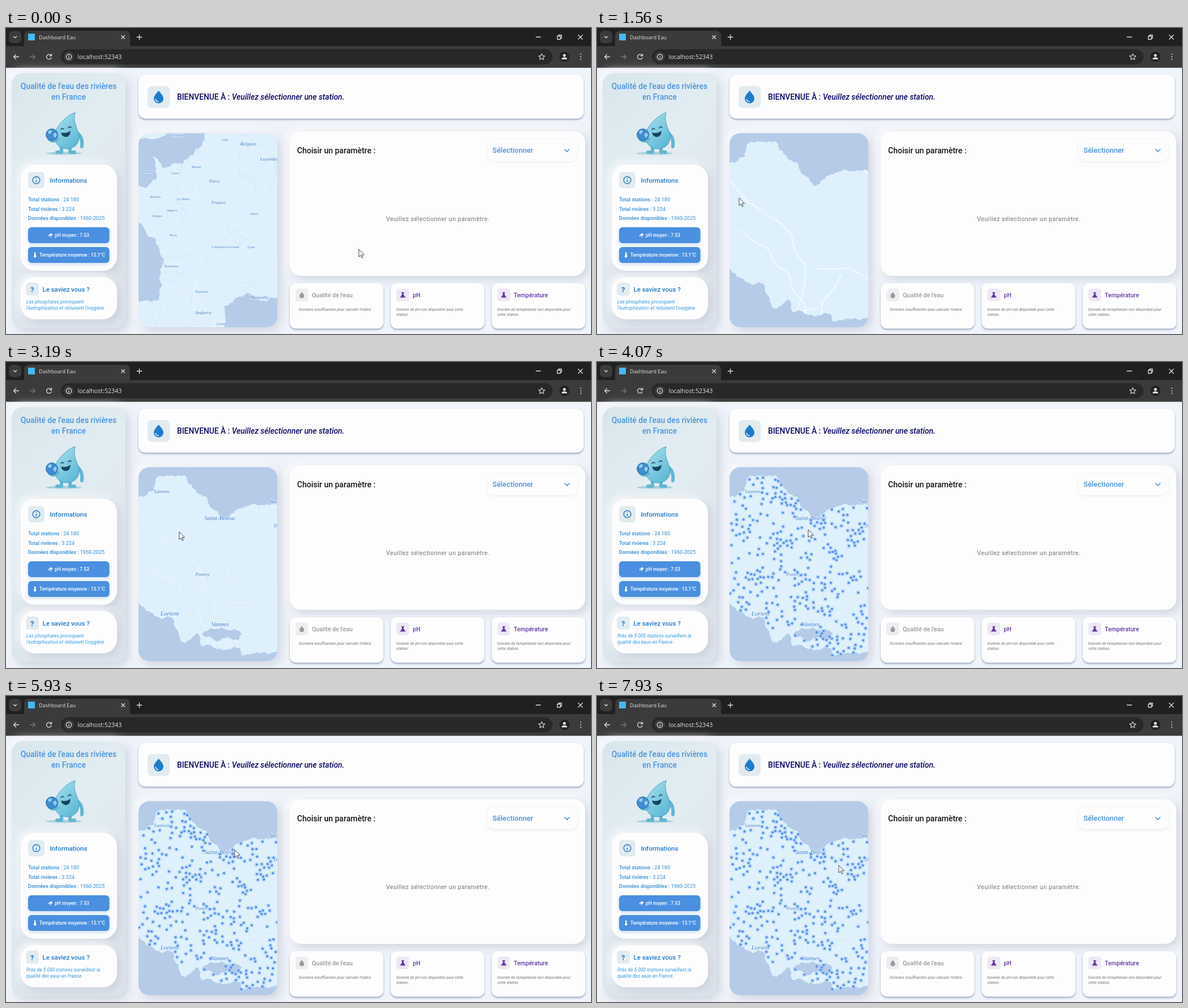
Recreate the animation shown at these times as an HTML page. Size 1033 px wide and 542 px high, loop 8000 ms.

```html
<!DOCTYPE html>
<html lang="fr">
<head>
<meta charset="utf-8">
<title>Dashboard Eau</title>
<style>
html, body { margin: 0; width: 100%; height: 100%; overflow: hidden; background: #eff3fa; }
svg { display: block; width: 1033px; height: 542px; font-family: Roboto, sans-serif; }
.ui { font-family: "Open Sans", sans-serif; fill: #e3e3e3; }
.m { font-weight: 500; }
.i { font-style: italic; }
.line { fill: none; stroke-linecap: round; stroke-linejoin: round; }
.soft { filter: drop-shadow(5px 5px 9px #aeb4c499) drop-shadow(-4px -4px 7px #fff); }
.card { fill: #fdfdfe; filter: drop-shadow(0 2px 1.5px #7d88a8bb); }
.btn { fill: #4a8fe0; filter: drop-shadow(0 2px 3px #4a90e255); }
.tile { fill: #e1ebf0; }
.fact { font-size: 8.1px; letter-spacing: .17px; fill: #2c95dd; }
.note { font-size: 6.85px; fill: #757575; }
.place { font-family: "Liberation Serif", serif; font-style: italic; text-anchor: middle; fill: #3c7fc4; stroke: #eaf4fd; stroke-width: 1.4px; paint-order: stroke; }
.sea { fill: #b5cbe8; stroke: #a5c3e5; stroke-width: .4px; }
.land { fill: #def0fc; }
</style>
</head>
<body>
<svg viewBox="0 0 1033 542">
<defs>
  <linearGradient id="side" x2=".4" y2="1"><stop stop-color="#d8e6ec"/><stop offset=".4" stop-color="#e2edf2"/><stop offset="1" stop-color="#dce4ec"/></linearGradient>
  <linearGradient id="body" x2=".7" y2="1"><stop stop-color="#a9e3ee"/><stop offset="1" stop-color="#5fb9d6"/></linearGradient>
  <clipPath id="frame"><rect x="234" y="186.500" width="245" height="343.500" rx="19"/></clipPath>
  <path id="drop" d="M0-11C4-6 8.500-2 8.500 3A8.500 8.500 0 0 1-8.500 3C-8.500-2-4-6 0-11Z"/>
  <path id="flask" d="M-2.500-5h5v1.300h-1v3L5 4.500H-5L-1.500-.7v-3h-1Z"/>
</defs>

<!-- browser -->
<rect width="1033" height="70" fill="#1f2020"/>
<rect y="32" width="1033" height="38.500" fill="#3b3b3b"/>
<rect x="5" y="5" width="22" height="22" rx="7" fill="#3b3b3b"/>
<rect x="32" y="5" width="187" height="40" rx="8" fill="#3b3b3b"/>
<rect x="39" y="10" width="12" height="12" fill="#47b8f2"/>
<text class="ui" x="58" y="20" font-size="9.15">Dashboard Eau</text>
<rect x="97" y="37.500" width="868" height="27" rx="13.500" fill="#282828"/>
<circle cx="111" cy="51" r="9" fill="#3b3b3b"/>
<text class="ui" x="126.500" y="55" font-size="10.65">localhost:52343</text>
<g class="line" stroke="#dedede" stroke-width="1.300">
  <path d="M13.500 15l2.500 2.500 2.500-2.500M204 13.500l5.500 5.500m0-5.500l-5.500 5.500M235.500 12v8.500m-4.250-4.250h8.500M936 16h8M1010.500 12.500l7.500 7.500m0-7.500l-7.500 7.500M973.500 14.500h5.500v5.500h-5.500ZM975.500 14.500v-2h5.500v5.500h-2"/>
  <path d="M22.500 51h-9m4-4l-4 4 4 4M79.700 49a4.300 4.300 0 1 0 .3 3.500M80.500 46v3.300h-3.300"/>
  <path stroke="#777" d="M42.500 51h9m-4-4l4 4-4 4"/>
  <circle cx="111" cy="51" r="4.600"/><path d="M111 50.800v2.200m0-4.300v.1"/>
  <path stroke-width="1.100" d="M946 45.500l1.600 3.600 3.900.4-2.900 2.600.8 3.900-3.400-2-3.400 2 .8-3.900-2.900-2.600 3.900-.4Z"/>
  <path stroke-width="2" d="M1015 46.500v.1m0 4.300v.1m0 4.300v.1"/>
</g>
<circle cx="986" cy="51" r="9" fill="#222"/>
<path d="M981 55.500q0-3.500 5-3.500t5 3.500Z" fill="#eee"/><circle cx="986" cy="48.500" r="2.500" fill="#eee"/>

<!-- sidebar -->
<rect class="soft" x="10" y="80" width="201" height="452" rx="20" fill="url(#side)"/>
<g class="m" font-size="13.900" fill="#4a93de" text-anchor="middle">
  <text x="110.500" y="108">Qualité de l'eau des rivières</text><text x="110.500" y="127">en France</text>
</g>
<ellipse cx="102" cy="222" rx="32" ry="2.500" fill="#8ec3d6" opacity=".7"/>
<g class="line" stroke="#62b6d1" stroke-width="6">
  <path d="M98 210v10h-8M113 210v10h8M126 186q10 8 8 24"/>
  <path d="M122 150c-9 2-24 13-33 29-8 15-1 34 17 35 18 0 27-13 21-31-3-9-9-20-5-33Z" fill="url(#body)" stroke="#3b95b7" stroke-width=".8"/>
  <path d="M91 197q-8 6-14 0"/>
  <circle cx="81" cy="189" r="10.500" fill="#3f8cd0" stroke="#205d9c" stroke-width=".8"/>
  <path d="M74 184q3-4 7-2l-1 4-4 2ZM83 188l5-3 2 5-4 5Z" fill="#9bcdec" stroke="none"/>
  <path d="M97 185q9 3 17-3-1 11-8 11t-9-8Z" fill="#17445f" stroke="none"/>
  <path d="M97 180q2-4 5-1M110 177q3-4 5-1" stroke="#173f59" stroke-width="1.500"/>
</g>
<rect class="soft" x="26" y="242" width="170" height="188" rx="25" fill="#fdfdfe"/>
<rect class="soft" x="26" y="441" width="170" height="75" rx="25" fill="#fdfdfe"/>
<rect class="tile" x="39" y="255" width="29" height="29" rx="6"/>
<rect class="tile" x="35" y="451" width="23" height="23" rx="5"/>
<g class="line" stroke="#2079c7" stroke-width="1.400"><circle cx="53.500" cy="269.500" r="6.300"/><path d="M53.500 269.500v3m0-6v.1"/></g>
<g class="m" fill="#2079c7" font-size="11.450">
  <text x="77.500" y="274">Informations</text>
  <text x="64.500" y="467">Le saviez vous ?</text>
  <text x="43" y="467.500" font-size="13" font-weight="700">?</text>
</g>
<g font-size="9.1" fill="#318ed4">
  <text x="39" y="307"><tspan class="m">Total stations :</tspan> 24 180</text>
  <text x="39" y="323.500"><tspan class="m">Total rivières :</tspan> 3 224</text>
  <text x="39" y="339.500"><tspan class="m">Données disponibles :</tspan> 1960-2025</text>
</g>
<rect class="btn" x="39" y="353" width="143.500" height="28" rx="6"/>
<rect class="btn" x="39" y="388" width="143.500" height="28" rx="6"/>
<g class="m" fill="#fff" font-size="8.4">
  <text x="86" y="370">pH moyen : 7.53</text><text x="59" y="405">Température moyenne : 13.1°C</text>
  <circle cx="79.500" cy="366" r="2.300"/><circle cx="76" cy="367.500" r="1.200"/><circle cx="79" cy="370" r=".9"/>
  <path d="M50 398.500a1.200 1.200 0 0 1 2.400 0v4a2.200 2.200 0 1 1-2.400 0Z"/>
</g>
<text class="fact i" x="36" y="488" id="fact1"></text>
<text class="fact i" x="36" y="499" id="fact2"></text>

<!-- header -->
<rect class="card" x="234" y="83" width="786" height="77.500" rx="12"/>
<rect class="tile" x="250" y="103" width="39" height="38.500" rx="7"/>
<use href="#drop" transform="translate(269.500 122)" fill="#1f7ccb"/>
<path class="line" d="M264 126q1 4 5 4.500" stroke="#e2ebf1" stroke-width="1.500"/>
<text class="m" x="302" y="127" font-size="13.800" fill="#0a0766">BIENVENUE À : <tspan class="i">Veuillez sélectionner une station.</tspan></text>

<!-- map -->
<rect class="soft land" x="234" y="186.500" width="245" height="343.500" rx="19"/>
<g clip-path="url(#frame)">
  <g id="country"></g>
  <g id="region"></g>
  <g id="dots"></g>
</g>

<!-- parameter panel -->
<rect class="soft" x="501" y="183" width="522" height="256" rx="20" fill="#fdfdfe"/>
<text class="m" x="514" y="221.500" font-size="14" fill="#161616">Choisir un paramètre :</text>
<rect x="850" y="197" width="159" height="39" rx="12" fill="#fdfdfe" style="filter:drop-shadow(0 1px 2px #c4cbd866)"/>
<text class="m" x="859" y="221" font-size="12.8" fill="#4a93de">Sélectionner</text>
<path class="line" d="M986.500 215l4 4 4-4" stroke="#3f8fdc" stroke-width="1.700"/>
<text x="671" y="342" font-size="10.8" letter-spacing=".42" fill="#777">Veuillez sélectionner un paramètre.</text>
<g id="cards"></g>

<path id="cursor" d="M0 0v13.500l3.100-2.900 2.200 4.800 2-.9-2.200-4.700h4.400Z" fill="#fff" stroke="#333" stroke-width=".9" stroke-linejoin="round"/>
</svg>
<script>
const LOOP = 8000, ZOOM = 5.66, PIVOT = [205, 285];
const $ = id => document.getElementById(id);
const add = (id, markup) => $(id).insertAdjacentHTML('beforeend', markup);
const clamp = v => Math.max(0, Math.min(1, v));

let seed = 11;
const rnd = () => {
  seed = (seed * 1664525 + 1013904223) % 4294967296;
  return seed / 4294967296;
};

// Ragged closed coastline by midpoint displacement
function coast(text) {
  let pts = text.split(' ').map(p => p.split(',').map(Number));
  for (let pass = 0; pass < 4; pass++)
    pts = pts.flatMap((a, k) => {
      const b = pts[(k + 1) % pts.length], dx = b[0] - a[0], dy = b[1] - a[1];
      const off = (rnd() - .5) * Math.min(.5, 8 / Math.hypot(dx, dy));
      return [a, [(a[0] + b[0]) / 2 - dy * off, (a[1] + b[1]) / 2 + dx * off]];
    });
  return `<path class="sea" d="M${pts.map(p => p.map(v => v.toFixed(1))).join('L')}Z"/>`;
}

// Thin wandering lines across the map
function trails(n, step, stroke, width, id = '') {
  let d = '';
  for (let k = 0; k < n; k++) {
    let angle = rnd() * 6.3;
    d += `M${234 + rnd() * 245 | 0} ${186 + rnd() * 344 | 0}`;
    for (let j = 0; j < 7; j++) {
      angle += (rnd() - .5) * 1.4;
      d += `l${(Math.cos(angle) * step).toFixed(1)} ${(Math.sin(angle) * step).toFixed(1)}`;
    }
  }
  return `<path id="${id}" class="line" stroke="${stroke}" stroke-width="${width}" d="${d}"/>`;
}

// Each place: name, centre x, baseline y
const places = (size, list) => list.split(';').map(s => {
  const [name, x, y] = s.split(',');
  return `<text class="place" x="${x}" y="${y}" font-size="${size}">${name}</text>`;
}).join('');

const land = '<path class="land" d="M-900-900h2500v2500H-900Z"/>';

add('country', land + trails(26, 9, '#c9e0f5', .6) + trails(26, 10, '#f1f8fe', .7) +
  coast('100,194 280,191 310,150 360,150 347,207 312,241 277,248 258,228 265,268 246,283 100,268') +
  coast('100,335 234,345 264,373 283,424 275,412 271,474 258,485 100,480') +
  coast('391,700 386,493 425,470 450,484 480,477 700,460 700,700') +
  places(8.5, 'Belgium,428,208;Luxembourg,470,235;Jersey,251,257;Paris,368,274;France,375,312;Andorra,348,507;Marseille,447,480') +
  places(6.5, 'Brighton,303,192;Lille,387,200;Rouen,336,248;Caen,298,259;Rennes,264,301;Le Mans,313,305;Angers,293,325;Nantes,267,335;Dijon,438,331;Niort,295,369;Clermont-Ferrand,387,390;Lyon,433,390;Bordeaux,292,424;Toulouse,345,469;Girona,381,526'));

add('region', land + trails(38, 11, '#eef7fe', .6, 'minor') + trails(9, 30, '#f3f9fe', 2, 'roads') +
  coast('100,230 236,238 262,227 264,207 318,203 331,224 355,240 383,280 404,263 441,251 480,256 900,200 900,-300 100,-300') +
  coast('100,400 234,425 276,456 290,452 317,499 336,481 345,503 412,507 414,521 480,513 900,600 900,1100 100,1100') +
  '<g id="detail">' + coast('347,481 361,472 402,474 416,481 409,492 366,491') +
  places(11, 'Saint-Brieuc,378,280;Lorient,289,449;Vannes,378,468;Saint-Malo,489,250') +
  places(8, 'Lannion,275,232;Pontivy,347,379;Dinan,483,293') + '</g>');

// Stations: clumped random points on land, kept apart from one another
const seas = [...document.querySelectorAll('#region > .sea')], stations = [];
const point = document.querySelector('svg').createSVGPoint();
for (let tries = 0; stations.length < 325 && tries < 9000; tries++) {
  const near = rnd() < .45 && stations[rnd() * stations.length | 0];
  const x = near ? near[0] + (rnd() - .5) * 24 : 234 + rnd() * 245;
  const y = near ? near[1] + (rnd() - .5) * 24 : 196 + rnd() * 330;
  point.x = x;
  point.y = y;
  if (x < 234 || x > 480 || seas.some(s => s.isPointInFill(point))) continue;
  if (stations.every(s => Math.hypot(s[0] - x, s[1] - y) > 5)) stations.push([x, y]);
}
const circles = (r, fill) => stations.map(([x, y]) => `<circle cx="${x.toFixed(1)}" cy="${y.toFixed(1)}" r="${r}" fill="${fill}"/>`).join('');
add('dots', circles(4, '#a9cdf980') + circles(2.1, '#5790ee'));

const cards = [
  ["Qualité de l'eau", "Données insuffisantes pour calculer l'indice."],
  ['pH', 'Donnée de pH non disponible pour cette', 'station.'],
  ['Température', 'Donnée de température non disponible pour', 'cette station.']
];
cards.forEach(([name, ...lines], k) => {
  const x = 501 + 178.3 * k, ink = k ? '#653aa5' : '#9b9b9b';
  add('cards', `<rect class="card" x="${x}" y="452" width="165.500" height="80.500" rx="11"/>
    <rect x="${x + 10}" y="461.500" width="22.500" height="22.500" rx="5" fill="${k ? '#ece8f4' : '#eeeef0'}"/>
    <use href="#${k ? 'flask' : 'drop'}" transform="translate(${x + 21.3} 473) scale(${k ? 1 : .48})" fill="${ink}"/>
    <text class="m" x="${x + 39}" y="476.500" font-size="10.6" fill="${ink}">${name}</text>` +
    lines.map((s, row) => `<text class="note i" x="${x + (k ? 10 : 16)}" y="${501 + 9.3 * row}">${s}</text>`).join(''));
});

const facts = [
  ['Les phosphates provoquent', "l'eutrophisation et réduisent l'oxygène"],
  ['Près de 5 000 stations surveillent la', 'qualité des eaux en France.']
];

// Pointer stops: time, x, y
const stops = [[0, 623, 392], [720, 251, 301], [1600, 251, 301], [2590, 268, 303],
  [4070, 373, 297], [5190, 400, 282], [6590, 407, 264], [LOOP, 427, 300]];

function pointer(t) {
  const k = stops.findIndex(s => s[0] > t), a = stops[k - 1], b = stops[k];
  const u = (t - a[0]) / (b[0] - a[0]), ease = u * u * (3 - 2 * u);
  return [a[1] + (b[1] - a[1]) * ease, a[2] + (b[2] - a[2]) * ease];
}

const scaled = k => `translate(${PIVOT}) scale(${k}) translate(${PIVOT.map(v => -v)})`;
const show = (id, on) => $(id).setAttribute('opacity', +on);

function draw() {
  const t = performance.now() % LOOP;
  // The wheel zooms in five notches
  const notch = Math.floor(clamp((t - 700) / 600) * 5) / 5, k = ZOOM ** notch;
  $('country').setAttribute('transform', scaled(k));
  $('region').setAttribute('transform', scaled(k / ZOOM));
  show('region', notch >= .8);
  const sharp = clamp((t - 1950) / 200);
  show('detail', sharp);
  show('minor', sharp);
  $('roads').setAttribute('stroke-width', 2.2 - 1.3 * sharp);
  show('dots', t >= 3260);
  [$('fact1').textContent, $('fact2').textContent] = facts[+(t >= 3330)];
  $('cursor').setAttribute('transform', `translate(${pointer(t)})`);
  requestAnimationFrame(draw);
}
draw();
</script>
</body>
</html>
```
